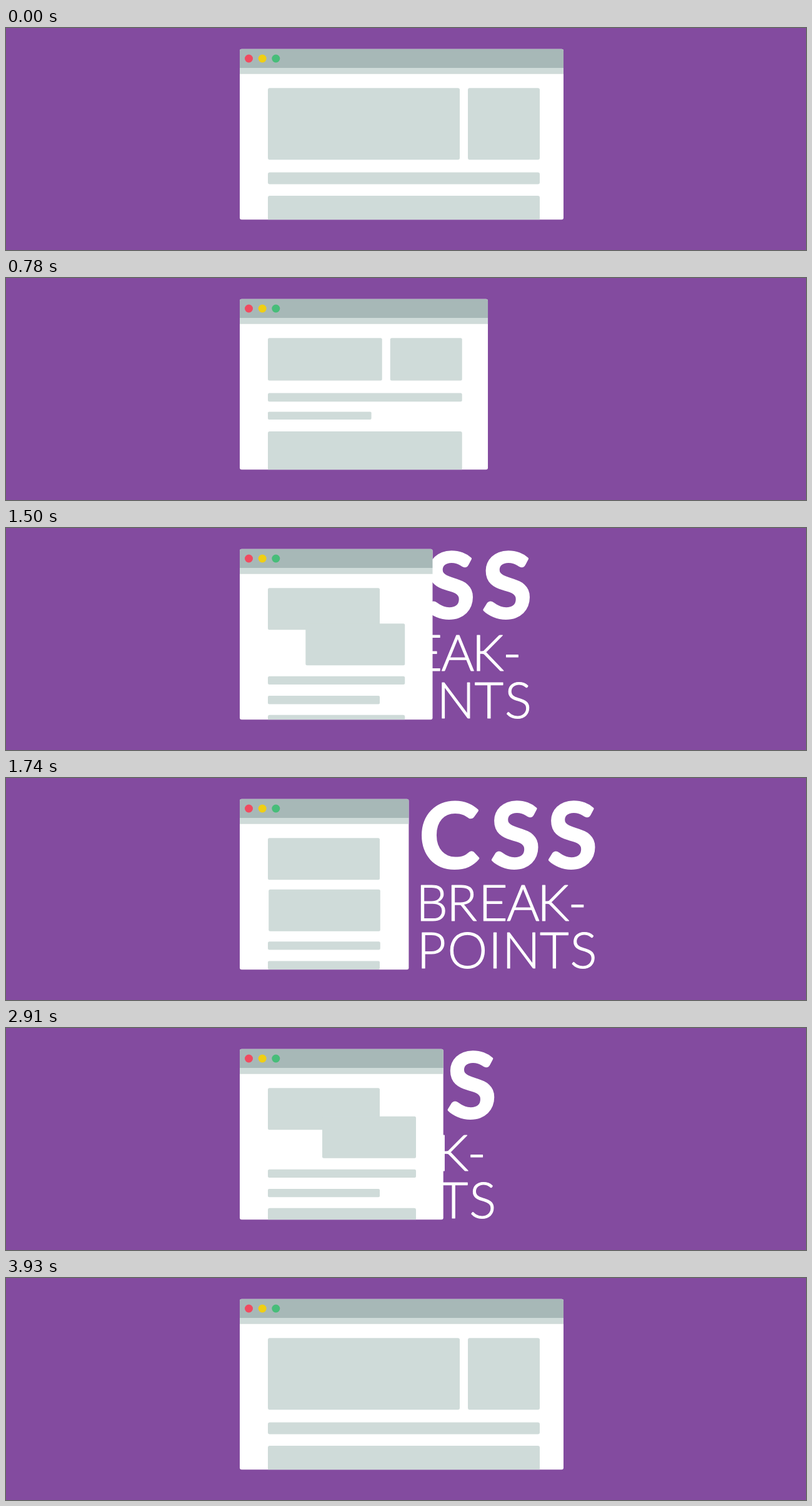
Write an HTML page with a canvas that moves like this. It is 1280 px wide and 356 px high and loops after 3960 ms.

```html
<!DOCTYPE html>
<html lang="en">
<head>
<meta charset="utf-8">
<title>CSS Breakpoints</title>
<style>
  html, body { margin: 0; width: 100%; height: 100%; overflow: hidden; background: #834b9f; }
  canvas { display: block; }
</style>
</head>
<body>
<canvas id="stage" width="1280" height="356"></canvas>
<script>
const ctx = document.getElementById('stage').getContext('2d');
const LOOP = 3960, STEP = 30;
const clamp = (v, lo, hi) => Math.min(hi, Math.max(lo, v));

// cubic-bezier(1/3, 0, 0, 1)
function ease(x) {
  if (x <= 0 || x >= 1) return clamp(x, 0, 1);
  let lo = 0, hi = 1;
  for (let i = 0; i < 24; i++) {
    const u = (lo + hi) / 2;
    if (u * (1 - u) ** 2 + u ** 3 < x) lo = u; else hi = u;
  }
  return 3 * lo * lo - 2 * lo ** 3;
}

function box(x, y, w, h, r, color) {
  ctx.fillStyle = color;
  ctx.beginPath();
  ctx.roundRect(x, y, w, h, r);
  ctx.fill();
}

function dot(x, color) {
  ctx.fillStyle = color;
  ctx.beginPath();
  ctx.arc(x, 49, 6.5, 0, 7);
  ctx.fill();
}

// Each letter is centred on its own x; the outline rounds the corners.
function line(text, centres, baseline, font, outline) {
  ctx.font = font;
  ctx.lineWidth = outline;
  [...text].forEach((letter, i) => {
    const m = ctx.measureText(letter);
    const x = centres[i] - (m.actualBoundingBoxRight - m.actualBoundingBoxLeft) / 2;
    ctx.fillText(letter, x, baseline);
    ctx.strokeText(letter, x, baseline);
  });
}

function drawTitle(shift) {
  const light = '300 80.5px Lato, sans-serif';
  ctx.save();
  ctx.translate(shift, 0);
  ctx.fillStyle = ctx.strokeStyle = '#fff';
  ctx.lineJoin = 'round';
  line('CSS', [713, 816, 907], 144.3, '700 144.5px Lato, sans-serif', 4);
  line('BREAK-', [685.5, 735, 783.5, 829.5, 881.5, 916.5], 228.6, light, 1.2);
  line('POINTS', [685.5, 740, 784.5, 826.5, 879.5, 925.5], 305.2, light, 1.2);
  ctx.restore();
}

function drawWindow(toMedium, toSmall, barScale) {
  const mix = (wide, medium, small) =>
    wide + (medium - wide) * toMedium + (small - medium) * toSmall;
  const gray = '#cfdbd9', left = 419;
  const width = mix(854, 726, 598) - left;
  const height = mix(115, 67, 67);
  const barHeight = mix(19, 13.4, 13.4);
  const radius = mix(3, 2.5, 2.5);

  ctx.save();
  ctx.beginPath();
  ctx.roundRect(374, 33.7, mix(892, 767.4, 643.6) - 374, 273.6, 3);
  ctx.clip();
  box(374, 33, 520, 275, 0, '#fff');
  box(374, 33, 520, 31, 0, '#a7b8b7');
  box(374, 64, 520, 9.7, 0, gray);
  dot(388.5, '#f14b60');
  dot(410.2, '#f0cf13');
  dot(431.8, '#47bd79');

  box(left, 96.2, mix(307, 179, 179), height, radius, gray);
  box(mix(739, 611, left), mix(96.2, 96.2, 179.4), mix(115, 115, 179), height, radius, gray);
  box(left, mix(231.5, 183.2, 262.7), width, barHeight, radius, gray);
  if (barScale > 0) {
    box(left, mix(214.5, 214.5, 294), 179 * barScale, 13.4 * barScale, 2 * barScale, gray);
  }
  box(left, mix(269, 245.3, 324.8), width, 120, 3, gray);
  ctx.restore();
}

function render(now) {
  const n = Math.floor(now % LOOP / STEP);
  const a = clamp(Math.min(n - 15, 131 - n), 0, 15);
  const b = clamp(Math.min(n - 45, 101 - n), 0, 15);
  box(0, 0, 1280, 356, 0, '#834b9f');
  if (b > 0) drawTitle(-262 * (1 - ease((b - 1) / 14)));
  drawWindow(ease(a / 15), ease(b / 15), ease((a - 5) / 10));
}

const start = performance.now();
(function tick() {
  render(performance.now() - start);
  requestAnimationFrame(tick);
})();
</script>
</body>
</html>
```
